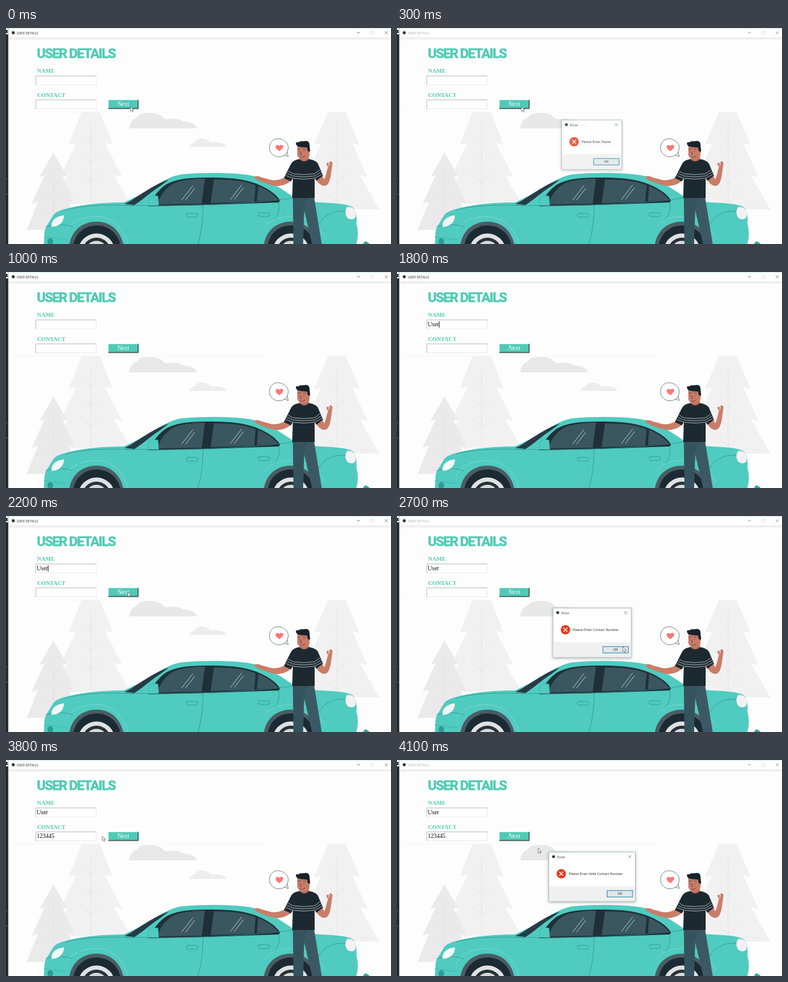
Write an HTML page that moves like this. It is 600 px wide and 338 px high and loops after 4.2 s.

```html
<!DOCTYPE html>
<html lang="en">
<head>
<meta charset="utf-8">
<title>User details</title>
<style>
html, body { margin: 0; width: 100%; height: 100%; overflow: hidden; background: #fdfdfd; }
svg { display: block; width: 600px; height: 338px; }
.ui { font-family: "Open Sans", "Noto Sans", sans-serif; font-size: 5.2px; fill: #222; }
.serif { font-family: "Liberation Serif", "Times New Roman", serif; font-size: 9.3px; }
.label { font-size: 9px; font-weight: bold; fill: #4fcab4; }
.head { font-family: Roboto, "Liberation Sans", sans-serif; font-weight: 700; font-size: 21px; letter-spacing: -1.4px; fill: #4fcab4; stroke: #4fcab4; stroke-width: .5; }
.line { fill: none; stroke-linecap: round; stroke-linejoin: round; }
</style>
</head>
<body>
<svg viewBox="0 0 600 338" xmlns="http://www.w3.org/2000/svg">
  <defs>
    <filter id="shade" x="-10%" y="-10%" width="120%" height="125%">
      <feDropShadow dx="0" dy="1.5" stdDeviation="2" flood-color="#000" flood-opacity=".3"/>
    </filter>
    <g id="wheel">
      <path d="M-43 0C-41-28-22-42 0-42S39-28 43 0Z" fill="#4b5c63"/>
      <path d="M-37 0C-35-24-18-36 0-36S36-24 38 0Z" fill="#1b2a33"/>
      <circle cy="5" r="28.5" fill="#dfe1e2"/>
      <circle cy="5" r="22" fill="#263238"/>
      <circle cy="5" r="17" fill="#d5d8d9"/>
    </g>
    <g id="glint" class="line" stroke="#e8eeee" stroke-width=".7">
      <path d="M0 22L17 0M6 22L20 4"/>
    </g>
  </defs>

  <rect width="600" height="338" fill="#fdfdfd"/>

  <!-- Trees and clouds -->
  <path d="M118 131H146L166 182L154 180L181 233L168 230L194 275H70L97 230L84 233L110 180L98 182Z" fill="#f2f1f2"/>
  <path d="M502 131H529L551 183L540 181L563 233L551 230L582 284H450L481 230L468 233L491 181L480 183Z" fill="#f2f1f2"/>
  <path d="M74 195L96 233L88 231L108 275L98 272L116 316H32L50 272L40 275L60 231L52 233Z" fill="#ebeaeb"/>
  <g id="twigs" class="line" stroke="#dedddf" stroke-width=".7"></g>
  <path d="M192 157C193 147 198 142 204 140C208 134 214 133 221 133C232 132 240 135 246 141C250 144 254 142 261 142C268 142 272 144 276 146C286 147 294 149 298 157Z" fill="#e9e8e9"/>
  <path d="M286 186C287 181 291 180 294 179C297 173 305 172 311 174C316 176 318 180 323 179C332 178 340 180 344 186Z" fill="#eeedee"/>
  <path d="M4 131.5H404" stroke="#f7f6f7" stroke-width=".8"/>

  <!-- Car -->
  <path d="M528 281C540 276 566 275 581 283" class="line" stroke="#ededee"/>
  <path d="M59 338L60 320C61 311 65 308 68 302L73 294C76 288 85 285 97 282C124 275 155 273 184 273L217 257C232 248 252 232 274 229C307 226 348 226 378 230C403 234 427 250 449 265C461 271 475 272 490 273C514 274 533 275 541 281C546 286 547 299 546 306C549 316 549 328 546 338Z" fill="#50cbc0"/>
  <path d="M184 275C192 273 199 267 207 262C220 254 234 244 254 237L241 247C225 257 212 270 200 277Z" fill="#263b45"/>
  <path d="M222 279C229 265 239 250 253 243C272 234 299 234 322 234C353 234 377 237 398 247C411 253 423 262 427 270L425 273L314 277Z" fill="#1f3039"/>
  <path d="M236 276C240 261 250 248 264 242C278 237 294 236 310 236L305 275Z" fill="#3a5661"/>
  <path d="M324 237C342 237 367 237 389 246L387 272L319 274Z" fill="#3a5661"/>
  <path d="M393 247C407 253 418 261 424 269L391 271Z" fill="#3a5661"/>
  <path d="M222 278C221 270 223 264 229 262L237 263L238 278Z" fill="#50cbc0" stroke="#35a69d" stroke-width=".5"/>
  <use href="#glint" x="274" y="247"/>
  <use href="#glint" x="350" y="246"/>
  <g class="line" stroke="#2c8f88" stroke-width=".7">
    <path d="M186 277C250 280 390 276 453 265M307 278C307 299 305 319 299 338M425 273C427 285 424 294 417 301M92 285C121 277 157 276 199 278"/>
    <rect x="281" y="290" width="18" height="6" rx="3"/>
    <rect x="393" y="289" width="18" height="6" rx="3"/>
    <path d="M62 311C77 306 92 307 104 311M487 308C495 292 511 285 531 287"/>
  </g>
  <g class="line" stroke="#86ded6" stroke-width=".7">
    <path d="M92 318C100 303 119 295 139 295S180 304 190 338M402 313C413 299 428 295 445 295S487 303 497 330"/>
  </g>
  <path d="M71 311C70 301 77 295 90 293C91 303 83 311 71 311Z" fill="#f2f7f7"/>
  <path d="M532 280C541 279 546 285 545 293C545 300 537 301 532 297C528 292 528 284 532 280Z" fill="#f4f1f3"/>
  <ellipse cx="69" cy="334" rx="4.5" ry="5" fill="#2c9c95"/>
  <path d="M59 327L94 331" stroke="#3cb1a8" stroke-width=".8"/>
  <use href="#wheel" x="141" y="345"/>
  <use href="#wheel" x="444" y="345"/>
  <path d="M557 338C557 334 561 333 563 335L567 338Z" fill="#35a69d"/>

  <!-- Man -->
  <path d="M434 234C428 237 421 239 414 238L399 234C392 231 388 231 386 234C390 237 394 239 399 241C410 245 419 248 426 247C434 246 440 243 444 239Z" fill="#c97d68"/>
  <path d="M492 229L496 237C499 231 500 222 502 217C498 214 499 209 503 211L506 208L509 211L508 218C506 229 506 239 501 245C495 250 488 245 483 237Z" fill="#c97d68"/>
  <path d="M501 211C503 209 505 211 503 215" class="line" stroke="#fff" stroke-width="1"/>
  <path d="M458 264H480L492 338H477L464 282Z" fill="#3b5964"/>
  <path d="M447 264H470L465 280L463 338H448Z" fill="#35535e"/>
  <path d="M458 196H472V205C472 211 458 211 458 205Z" fill="#bd6d5a"/>
  <path d="M458 205C451 206 447 208 444 213L433 235L444 240L447 235L446 266H481V235L484 239L494 231L486 212C483 208 478 206 472 205C468 210 461 210 458 205Z" fill="#1d2930"/>
  <path class="line" id="stripes" stroke="#dce3e3" stroke-width=".7"/>
  <path d="M454 185C457 180 468 181 472 185L473 199C472 208 457 209 454 199Z" fill="#c97d68"/>
  <path d="M452 182C451 179 453 178 456 179C458 176 463 178 465 177C470 176 473 178 473 183L474 193L471 195L469 187C463 187 457 186 454 185Z" fill="#17232b"/>
  <circle cx="471.5" cy="195" r="2" fill="#c97d68"/>
  <g class="line" stroke="#26292c" stroke-width=".6"><path d="M455 190L459 189M463 189L467 190M457.5 193V194M464 193V194M459 202C462 203 464 202 466 200M460 194L459 198H461"/></g>
  <path d="M439 194C435 201 424 204 417 199C408 193 409 180 417 175C427 170 440 177 440 188L438 195L440 201L434 199" fill="#fff" stroke="#4b5559" stroke-width=".7"/>
  <path d="M426 193C421 189 419 187 421 184C423 182 426 183 426 185C427 182 431 182 432 185C432 188 429 190 426 193Z" fill="#ff7773"/>

  <!-- Window frame -->
  <rect width="600" height="1" fill="#cfeee2"/>
  <rect x="4" y="1" width="596" height="14" fill="#fff"/>
  <rect x="4" y="14.5" width="596" height="3.5" fill="#f0edef"/>
  <rect width="3.5" height="338" fill="#20272c"/>
  <rect width="3.5" height="10" fill="#e9f3f1"/>
  <rect y="3" width="2.5" height="5" fill="#333b40"/>
  <path d="M0 236H2M0 260H2.5" stroke="#5d686d"/>
  <circle cx="11.3" cy="7.5" r="2.4" fill="#27323b"/>
  <g id="bar">
    <text class="ui" x="16.5" y="9.6" style="fill:inherit">USER DETAILS</text>
    <path d="M547 7.5H551.5M590.3 5.3L594.7 9.7M594.7 5.3L590.3 9.7" stroke="#555" stroke-width=".7"/>
  </g>
  <rect x="569" y="5.3" width="4" height="4" fill="none" stroke="#d2d2d2" stroke-width=".6"/>

  <!-- Form -->
  <text class="head" x="48" y="47">USER DETAILS</text>
  <text class="serif label" x="48.5" y="70.3">NAME</text>
  <text class="serif label" x="48.5" y="107.7">CONTACT</text>
  <g id="fields"></g>
  <text class="serif" id="name" x="47.8" y="85" fill="#111"></text>
  <text class="serif" id="contact" x="47.8" y="122.3" fill="#111"></text>
  <path id="caret" stroke="#111" stroke-width=".9"/>
  <rect x="159" y="112" width="47.5" height="14.6" fill="#263238"/>
  <path d="M159 112H206.5L205.3 113H160V125.4L159 126.6Z" fill="#d6f0eb"/>
  <rect x="160" y="113" width="45.3" height="12.4" fill="#4fcab6"/>
  <text class="serif" x="182.7" y="122.3" fill="#fff" text-anchor="middle">Next</text>

  <g id="dialogs"></g>
  <path id="cursor" d="M0 0V7.2L1.7 5.7L2.9 8.3L4.1 7.7L3 5.2H5.2Z" fill="#fff" stroke="#444" stroke-width=".6"/>
</svg>
<script>
const LOOP = 4200, STEP = 100;
const $ = id => document.getElementById(id);

function twigs(x, top, bottom, gap) {
  let d = `M${x} ${top}V${bottom}`;
  for (let y = top + gap, w = 9; y < bottom - 8; y += gap, w += 4)
    d += `M${x - w} ${y - w * .85}L${x} ${y}L${x + w} ${y - w * .85}`;
  return `<path d="${d}"/>`;
}
$('twigs').innerHTML = twigs(132, 149, 274, 31) + twigs(516, 149, 284, 31) + twigs(74, 220, 316, 25);

$('stripes').setAttribute('d', [0, 3.5, 7].map(y =>
  `M${440 - y / 2} ${224 + y}L447 ${228 + y}Q464 ${231 + y} 481 ${228 + y}L${489 + y / 2} ${222 + y}`).join(''));

const field = y => `<rect x="46.5" y="${y}" width="94" height="14" fill="#fff" stroke="#e8e8e8" stroke-width=".9"/>
  <path d="M46.5 ${y + 14}V${y}H140.5" fill="none" stroke="#b5b5b5" stroke-width=".8"/>`;
$('fields').innerHTML = field(75) + field(112.5);

const dialogs = [
  { from: 300, to: 800, x: 256.5, w: 94, text: 'Please Enter Name' },
  { from: 2400, to: 2800, x: 243, w: 122, text: 'Please Enter Contact Number' },
  { from: 4000, to: 4200, x: 236.5, w: 135, text: 'Please Enter Valid Contact Number' }
];
$('dialogs').innerHTML = dialogs.map(({ x, w, text }) => `<g transform="translate(${x} 144)">
  <rect width="${w}" height="77" fill="#fff" stroke="#7fa3a3" stroke-width=".7" filter="url(#shade)"/>
  <rect x=".4" y="53.5" width="${w - .8}" height="23.2" fill="#f0f0f0"/>
  <circle cx="7.5" cy="7.3" r="2.3" fill="#27323b"/>
  <text class="ui" x="13.3" y="9.5">Error</text>
  <path d="M${w - 11} 5L${w - 6.4} 9.6M${w - 6.4} 5L${w - 11} 9.6" stroke="#555" stroke-width=".6"/>
  <circle cx="19.5" cy="34" r="7.3" fill="#e23b1e"/>
  <path d="M16.4 30.9L22.6 37.1M22.6 30.9L16.4 37.1" stroke="#fff" stroke-width="1.3"/>
  <text class="ui" x="31" y="35.9">${text}</text>
  <rect x="${w - 44}" y="60.3" width="39.6" height="10" fill="#e2e6e8" stroke="#3497b4" stroke-width="1.1"/>
  <text class="ui" x="${w - 24.2}" y="67.3" text-anchor="middle">OK</text>
</g>`).join('');
const boxes = [...$('dialogs').children];

// Pointer runs: start, end, then the two ends of the path
const runs = [
  [0, 400, 194, 123, 194, 123],
  [400, 700, 194, 123, 326, 206],
  [700, 1000, 326, 206, 110, 82],
  [1900, 2200, 110, 82, 190, 119],
  [2200, 2500, 190, 119, 190, 119],
  [2500, 2700, 190, 119, 352, 205],
  [2700, 3000, 352, 205, 110, 119],
  [3700, 3900, 110, 119, 190, 119],
  [3900, 4000, 190, 119, 190, 119],
  [4000, 4200, 190, 119, 250, 157]
];
const ease = p => p * p * (3 - 2 * p);
const typed = (word, t, start) => word.slice(0, Math.max(0, Math.floor((t - start) / STEP) + 1));

function draw(t) {
  let open = false;
  dialogs.forEach((d, i) => {
    const on = t >= d.from && t < d.to;
    open = open || on;
    boxes[i].style.display = on ? '' : 'none';
    boxes[i].style.opacity = on && t === d.from ? .82 : 1;
  });
  $('bar').setAttribute('fill', open ? '#999' : '#222');
  $('bar').setAttribute('opacity', open ? .8 : 1);

  $('name').textContent = typed('User', t, 1400);
  $('contact').textContent = typed('123445', t, 3200);

  const inName = t >= 1100 && t < 2300, inContact = t >= 3000 && t < 3900;
  const active = $(inContact ? 'contact' : 'name');
  const blink = inName ? (t - 1200) % 900 < 700 : inContact && (t - 3000) % 900 < 300;
  const x = 48.2 + active.getComputedTextLength(), y = inContact ? 114.5 : 77;
  $('caret').setAttribute('d', blink ? `M${x} ${y}v10` : '');

  const run = runs.find(r => t >= r[0] && t < r[1]);
  $('cursor').style.display = run ? '' : 'none';
  if (run) {
    const [a, b, x0, y0, x1, y1] = run, p = ease((t - a) / (b - a));
    $('cursor').setAttribute('transform', `translate(${x0 + (x1 - x0) * p} ${y0 + (y1 - y0) * p})`);
  }
}

const begin = performance.now();
function tick() {
  draw(Math.floor(((performance.now() - begin) % LOOP) / STEP) * STEP);
  requestAnimationFrame(tick);
}
tick();
</script>
</body>
</html>
```
